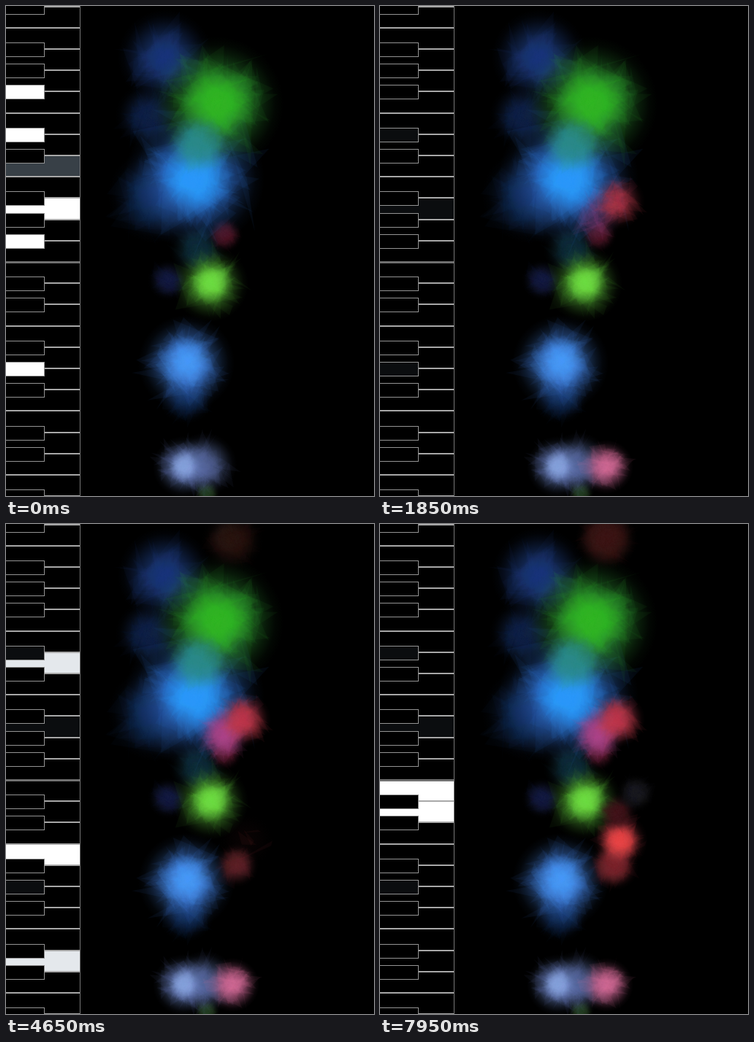
These frames come from a looping animation (504x672 px, 8000 ms). An HTML page with a canvas:

```html
<!DOCTYPE html>
<html>
<head>
<meta charset="utf-8">
<style>
html, body { margin: 0; width: 100%; height: 100%; overflow: hidden; background: #000; }
canvas { display: block; }
</style>
</head>
<body>
<canvas id="stage" width="504" height="672"></canvas>
<script>
const W = 504, H = 672, LOOP = 8000, STEP = 50, FADE = 560, KEY_H = 29.2;
const ctx = document.getElementById('stage').getContext('2d');
const clamp = v => Math.max(0, Math.min(1, v));

function randomFrom(seed) {
  return () => {
    seed = (seed + 0x6D2B79F5) | 0;
    let r = Math.imul(seed ^ (seed >>> 15), 1 | seed);
    r = (r + Math.imul(r ^ (r >>> 7), 61 | r)) ^ r;
    return ((r ^ (r >>> 14)) >>> 0) / 4294967296;
  };
}

// A soft glow roughened by translucent triangles with normally spread corners
function paint(g, x, y, r, color, part = 1) {
  if (!part) return;
  const rand = randomFrom(x * 977 + y * 31);
  const corner = () => {
    const d = r * Math.min(1.15, 0.42 * Math.sqrt(-2 * Math.log(1 - rand())));
    const a = rand() * Math.PI * 2;
    return [x + d * Math.cos(a), y + d * Math.sin(a)];
  };
  const glow = g.createRadialGradient(x, y, 0, x, y, r);
  for (let k = 0; k <= 1; k += 0.125) {
    const alpha = Math.round(215 * (1 - k * k) ** 2);
    glow.addColorStop(k, color + alpha.toString(16).padStart(2, '0'));
  }
  g.globalAlpha = part;
  g.fillStyle = glow;
  g.fillRect(x - r, y - r, 2 * r, 2 * r);

  g.globalAlpha = 0.07;
  g.fillStyle = color;
  for (let i = 0; i < 60 * part; i++) {
    g.beginPath();
    for (let j = 0; j < 3; j++) g.lineTo(...corner());
    g.fill();
  }
  g.globalAlpha = 1;
}

// [x, y, radius, color, color of the bright core]
const still = [
  [218, 70, 65, '#1d3d80'],
  [195, 150, 45, '#142850'],
  [205, 260, 65, '#142c58'],
  [262, 335, 38, '#123440'],
  [222, 376, 28, '#1a2248'],
  [300, 314, 24, '#5a1c30'],
  [247, 535, 38, '#142c58'],
  [275, 668, 18, '#2c4824'],
  [258, 237, 96, '#3270d4', '#2aa0fa'],
  [288, 134, 92, '#2f9a34', '#34bc28'],
  [262, 190, 45, '#2c8c88'],
  [280, 381, 52, '#4c9c30', '#74e044'],
  [247, 490, 66, '#3f78cc', '#4c9af4'],
  [272, 629, 44, '#56689a'],
  [243, 632, 42, '#6078b0', '#88a4de']
];

// [x, y, radius, color, start, end]
const growing = [
  [310, 632, 37, '#d86c9e', 0, 1200],
  [298, 288, 38, '#b04488', 1450, 3000],
  [325, 268, 38, '#c83c50', 1000, 2200],
  [316, 468, 30, '#6a2830', 2250, 3000],
  [303, 19, 24, '#18181a', 2900, 3200],
  [310, 22, 42, '#2e1812', 3800, 4400],
  [310, 20, 42, '#401818', 5450, 5950],
  [322, 470, 32, '#7a2830', 5450, 5950],
  [329, 434, 38, '#a0343c', 4600, 5400],
  [328, 435, 30, '#f04c4c', 5450, 5950],
  [325, 396, 28, '#4a1a22', 7250, 7400],
  [350, 369, 26, '#222224', 7550, 7600]
];

// Keys are struck at `on`, start fading at `off` and may keep a faint `rest` glow
const chords = [
  { on: 0, off: 600, black: [4, 11] },
  { on: 0, off: 600, black: [6, 17], white: [9], rest: 0.045 },
  { on: 0, off: -437, white: [7] },
  { on: 50, off: 600, white: [7] },
  { on: 2300, off: 3850, black: [11], white: [16, 20] },
  { on: 2550, off: 3850, white: [7] },
  { on: 2950, off: 3850, black: [4] },
  { on: 3400, off: 3920, black: [2] },
  { on: 4650, off: 4590, white: [6, 20] },
  { on: 4650, off: 4650, white: [15], green: 160 },
  { on: 7950, off: LOOP, white: [12, 13] }
];

// Fading keys take on a cool tint
function keyColor({ on, off, rest = 0, green = 45 }, t) {
  if (t < on) return null;
  const level = Math.max(rest, clamp(1 - (t - off) / FADE));
  const mid = level * (1 - level);
  return level && `rgb(${255 * level}, ${255 * level + green * mid}, ${255 * level + 85 * mid})`;
}

function rect(color, x, y, w, h) {
  ctx.fillStyle = color;
  ctx.fillRect(x, y, w, h);
}

const lineY = i => Math.round(i * KEY_H + 0.5);
const noBlack = [1, 5, 8, 12, 15, 19, 22];

function drawKeys(t) {
  const white = [], black = [];
  for (const chord of chords) {
    const color = keyColor(chord, t);
    if (!color) continue;
    for (const i of chord.white || []) white[i] = color;
    for (const i of chord.black || []) black[i] = color;
  }

  rect('#000', 0, 0, 102, H);
  white.forEach((color, i) => rect(color, 0, lineY(i), 101, lineY(i + 1) - lineY(i)));
  for (let i = 0; i <= 23; i++) {
    const y = lineY(i);
    if (noBlack.includes(i)) {
      if (i === 12) rect('#707070', 0, y - 1, 102, 3);
      else rect('#a8a8a8', 0, y - 1, 102, 2);
    } else {
      rect('#a8a8a8', 52, y - 1, 50, 2);
      rect(black[i] || '#000', 0, y - 9, 52, 19);
      ctx.strokeStyle = '#949494';
      ctx.strokeRect(-2.5, y - 8.5, 55, 19);
    }
  }
  rect('#777', 101, 0, 1, H);
}

const backdrop = document.createElement('canvas');
backdrop.width = W;
backdrop.height = H;
const back = backdrop.getContext('2d');
back.fillRect(0, 0, W, H);
for (const [x, y, r, color, core] of still) {
  paint(back, x, y, r, color);
  if (core) paint(back, x + 1, y - 1, r * 0.58, core);
}

const start = performance.now();
function frame() {
  const t = Math.floor(((performance.now() - start) % LOOP) / STEP) * STEP;
  ctx.drawImage(backdrop, 0, 0);
  for (const [x, y, r, color, from, to] of growing) {
    paint(ctx, x, y, r, color, clamp((t - from) / (to - from)));
  }
  drawKeys(t);
  requestAnimationFrame(frame);
}
frame();
</script>
</body>
</html>
```
